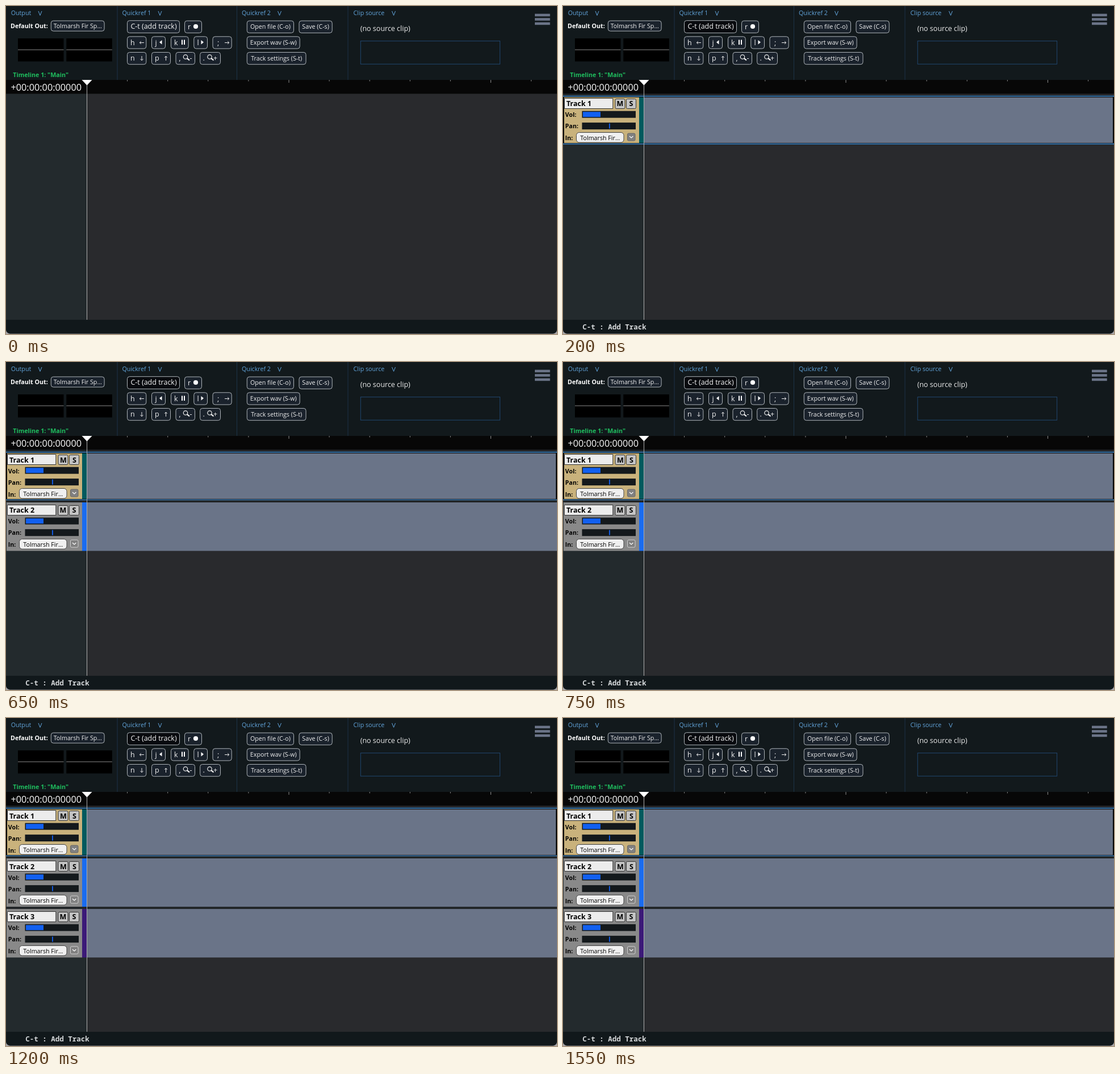
Recreate the animation shown at these times as an HTML page with a canvas. Size 970 by 577 pixels, loop 1.6 s.

```html
<!DOCTYPE html>
<html lang="en">
<head>
<meta charset="utf-8">
<title>Add tracks</title>
<style>
  html, body { margin: 0; width: 100%; height: 100%; overflow: hidden; background: #11181b; }
  canvas { display: block; width: 970px; height: 577px; }
</style>
</head>
<body>
<canvas id="stage" width="970" height="577"></canvas>
<script>
const ctx = document.getElementById('stage').getContext('2d');
const LOOP = 1600;
const PITCH = 89;
const SMALL = 10.7, MEDIUM = 12.5, LARGE = 16.25;
const ROWS = [25.6, 53.3, 81];
const SANS = '"Open Sans", "Noto Sans", sans-serif';
const MONO = '"Noto Sans Mono", "Liberation Mono", monospace';
const DEVICE = 'Tolmarsh Fir';
const TRACKS = [
  { start: 200, strip: '#005a5e' },
  { start: 650, strip: '#1a6cf0' },
  { start: 1200, strip: '#3c1a78' }
];

function rect(x, y, w, h, color) {
  ctx.fillStyle = color;
  ctx.fillRect(x, y, w, h);
}

function text(str, x, y, size, color, weight = 400, family = SANS, align = 'left') {
  ctx.font = `${weight} ${size}px ${family}`;
  ctx.textAlign = align;
  ctx.fillStyle = color;
  ctx.fillText(str, x, y);
}

function path(points, color, width = 1) {
  ctx.beginPath();
  points.forEach(([x, y]) => ctx.lineTo(x, y));
  ctx.strokeStyle = color;
  ctx.lineWidth = width;
  ctx.stroke();
}

function polygon(points, color) {
  ctx.beginPath();
  points.forEach(([x, y]) => ctx.lineTo(x, y));
  ctx.fillStyle = color;
  ctx.fill();
}

function box(x0, y0, x1, y1, radius, fill, stroke) {
  ctx.beginPath();
  ctx.roundRect(x0 + 0.5, y0 + 0.5, x1 - x0 - 1, y1 - y0 - 1, radius);
  ctx.fillStyle = fill;
  ctx.fill();
  ctx.strokeStyle = stroke;
  ctx.lineWidth = 1;
  ctx.stroke();
}

function button(x0, y0, x1, y1, fill = '#1a222c') {
  box(x0, y0, x1, y1, 4, fill, '#aeb4b9');
}

function textButton(label, x0, row, x1) {
  const y = ROWS[row];
  button(x0, y, x1, y + 22.2);
  text(label, (x0 + x1) / 2, y + 14.7, SMALL, '#f0f0f0', 400, SANS, 'center');
}

function keyButton(label, x0, row, x1, labelX) {
  const y = ROWS[row];
  button(x0, y, x1, y + 22.2);
  text(label, labelX, y + 15.2, MEDIUM, '#f0f0f0');
}

// Small arrow centred on x, y; angle 0 points right
function arrow(x, y, angle) {
  ctx.save();
  ctx.translate(x, y);
  ctx.rotate(angle);
  path([[-4, 0], [3.5, 0]], '#e8e8e8');
  path([[1.2, -2.4], [3.8, 0], [1.2, 2.4]], '#e8e8e8');
  ctx.restore();
}

function magnifier(x, y) {
  ctx.beginPath();
  ctx.arc(x, y, 3.7, 0, Math.PI * 2);
  ctx.strokeStyle = '#f0f0f0';
  ctx.lineWidth = 1.2;
  ctx.stroke();
  path([[x + 2.8, y + 2.6], [x + 7, y + 6]], '#f0f0f0', 2.2);
}

function panelTitle(label, x, chevronX) {
  text(label, x, 16, SMALL, '#62a5dc');
  path([[chevronX - 3, 9], [chevronX, 16.5], [chevronX + 3, 9]], '#62a5dc');
}

function drawOutput() {
  panelTitle('Output', 8.7, 60);
  text('Default Out:', 8, 39, SMALL, '#ffffff', 700);
  button(78.8, 25.5, 173.6, 44.6);
  text(DEVICE + ' Sp...', 126.3, 39, SMALL, '#f0f0f0', 400, SANS, 'center');
  for (const x of [21, 106.3]) {
    rect(x, 57, 80.5, 40.5, '#000');
    rect(x, 76.5, 80.5, 1, '#8c8c8c');
  }
}

function drawQuickrefs(pressed) {
  panelTitle('Quickref 1', 204.5, 271);
  button(213, 25.2, 306, 47.8, pressed ? '#080a0e' : '#1a222c');
  text('C-t (add track)', 260, 40, MEDIUM, '#f4f4f4', 400, SANS, 'center');

  keyButton('r', 314, 0, 345, 320);
  ctx.beginPath();
  ctx.arc(334, 36, 4.1, 0, Math.PI * 2);
  ctx.fillStyle = '#fff';
  ctx.fill();

  keyButton('h', 213, 1, 247.3, 219);
  arrow(239, 64.5, Math.PI);
  keyButton('j', 256, 1, 281, 262.5);
  polygon([[274.5, 60], [274.5, 67.5], [270, 63.7]], '#fff');
  keyButton('k', 290, 1, 321.7, 296);
  rect(309, 59.5, 2, 8.5, '#fff');
  rect(313, 59.5, 2, 8.5, '#fff');
  keyButton('l', 330.3, 1, 355, 336.5);
  polygon([[343.5, 60], [343.5, 67.5], [348, 63.7]], '#fff');
  keyButton(';', 363.5, 1, 397.7, 372);
  arrow(389, 64.5, 0);

  keyButton('n', 213, 2, 247.3, 219);
  arrow(239, 92, Math.PI / 2);
  keyButton('p', 256, 2, 290, 262);
  arrow(281.5, 92, -Math.PI / 2);
  keyButton(',', 298.5, 2, 333, 304.5);
  magnifier(316, 89.5);
  text('-', 323.5, 96, MEDIUM, '#f0f0f0');
  keyButton('.', 341.2, 2, 378, 346.5);
  magnifier(358.5, 89.5);
  text('+', 365, 96, MEDIUM, '#f0f0f0');

  panelTitle('Quickref 2', 415, 481.5);
  textButton('Open file (C-o)', 423.8, 0, 507);
  textButton('Save (C-s)', 515.5, 0, 574.7);
  textButton('Export wav (S-w)', 423.8, 1, 517.7);
  textButton('Track settings (S-t)', 423.8, 2, 528.5);
}

function drawTop(pressed) {
  rect(0, 0, 970, 130, '#12191c');
  for (const x of [195.5, 406, 601.5]) rect(x, 0, 1, 130, '#1c3348');
  drawOutput();
  drawQuickrefs(pressed);

  panelTitle('Clip source', 611.5, 682.5);
  text('(no source clip)', 623.7, 44, MEDIUM, '#ececec');
  ctx.strokeStyle = '#20466f';
  ctx.lineWidth = 1;
  ctx.strokeRect(624.3, 61.6, 245.3, 40.6);

  for (let i = 0; i < 3; i++) rect(931, 13.7 + i * 7.5, 26.7, 4.5, '#6b7488');
  text('Timeline 1: "Main"', 12.3, 125, SMALL, '#1fbf5f', 700);
}

function drawTimeline() {
  rect(0, 130, 970, 24.5, '#070707');
  for (let i = 1; i < 12; i++) {
    rect(142 + i * 71.1, 130, 1, i % 5 ? 2.5 : 5, '#8d8d8d');
  }
  text('+00:00:00:00000', 8.5, 148.5, LARGE, '#fff');
  rect(0, 154.5, 142, 398, '#232a2d');
  rect(142, 154.5, 828, 398, '#292a2d');
}

function drawLane(track, selected, top) {
  if (selected) {
    rect(0, 157, 970, 87, '#000');
    rect(0, 157.8, 970, 1.5, '#4c9ee6');
    rect(0, 241.9, 970, 1.5, '#4c9ee6');
  } else {
    rect(0, top - 4, 970, 4, '#222629');
  }
  const edge = selected ? 2 : 1;
  const y = selected ? 160.6 : top;
  const h = selected ? 80.4 : 85.3;
  rect(edge, y, 134 - edge, h, selected ? '#c9b27c' : '#898989');
  rect(134, y, 8, h, track.strip);
  rect(142, y, selected ? 826 : 828, h, '#6a7488');
}

// Labels sit one pixel lower once a later track has been added
function drawTrack(index, track, settled) {
  const selected = index === 0;
  const dy = index * PITCH;
  const nudge = settled ? 1 : 0;
  drawLane(track, selected, 158 + dy);

  ctx.save();
  ctx.translate(0, dy);
  box(2, 162, 88.3, 181, 0, '#ececec', '#333');
  text('Track ' + (index + 1), 6, 175.9 + nudge, MEDIUM, '#000', 700);
  for (const [label, x] of [['M', 91.5], ['S', 111]]) {
    box(x, 163, x + 18, 181, 2, '#c4c4c4', '#333');
    text(label, x + 9 + nudge / 2, 176 + nudge, MEDIUM, '#000', 700, SANS, 'center');
  }

  text('Vol:', 3.8, 194.8 + nudge, SMALL, '#000', 700);
  rect(33.5, 184.7, 94.5, 12, '#14191c');
  rect(35, 186.2, 31, 9, '#1260f0');
  text('Pan:', 3.8, 215.1 + nudge, SMALL, '#000', 700);
  rect(33.5, 205.1, 94.5, 12, '#14191c');
  rect(81, 206.6, 1.8, 9, '#1260f0');
  text('In:', 3.8, 235.6 + nudge, SMALL, '#000', 700);
  box(23, 222, 107.5, 240.5, 5, '#f0f0f0', '#444');
  text(DEVICE + '...', 65.4, 235.6, SMALL, '#000', 400, SANS, 'center');
  box(113, 223.5, 127.5, 237.5, 2, '#808080', selected ? '#666' : '#d0d0d0');
  path([[117, 229], [120.2, 232], [123.4, 229]], '#fff', 1.2);
  ctx.restore();
}

function drawPlayhead() {
  rect(142, 138, 1, 414.5, '#b0b0b0');
  polygon([[133.5, 130], [151.5, 130], [142.5, 139.5]], '#fff');
}

function drawStatus(visible) {
  rect(0, 552, 970, 25, '#11181b');
  if (visible) text('C-t : Add Track', 34.3, 568.7, MEDIUM, '#d6d9db', 600, MONO);
}

// Light surface below the rounded bottom of the window
function drawWindowEdge() {
  const r = 7, y = 576.4;
  ctx.beginPath();
  ctx.moveTo(0, y - r);
  ctx.arcTo(0, y, r, y, r);
  ctx.lineTo(970 - r, y);
  ctx.arcTo(970, y, 970, y - r, r);
  ctx.lineTo(970, 577);
  ctx.lineTo(0, 577);
  ctx.closePath();
  ctx.fillStyle = '#a6a3a6';
  ctx.fill();
}

function draw(t) {
  drawTop((t >= 150 && t < 950) || t >= 1200);
  drawTimeline();
  TRACKS.forEach((track, i) => {
    const next = TRACKS[i + 1];
    if (t >= track.start) drawTrack(i, track, next && t >= next.start);
  });
  drawPlayhead();
  drawStatus(t >= 150);
  drawWindowEdge();
}

const start = performance.now();
function tick() {
  draw((performance.now() - start) % LOOP);
  requestAnimationFrame(tick);
}
tick();
</script>
</body>
</html>
```
